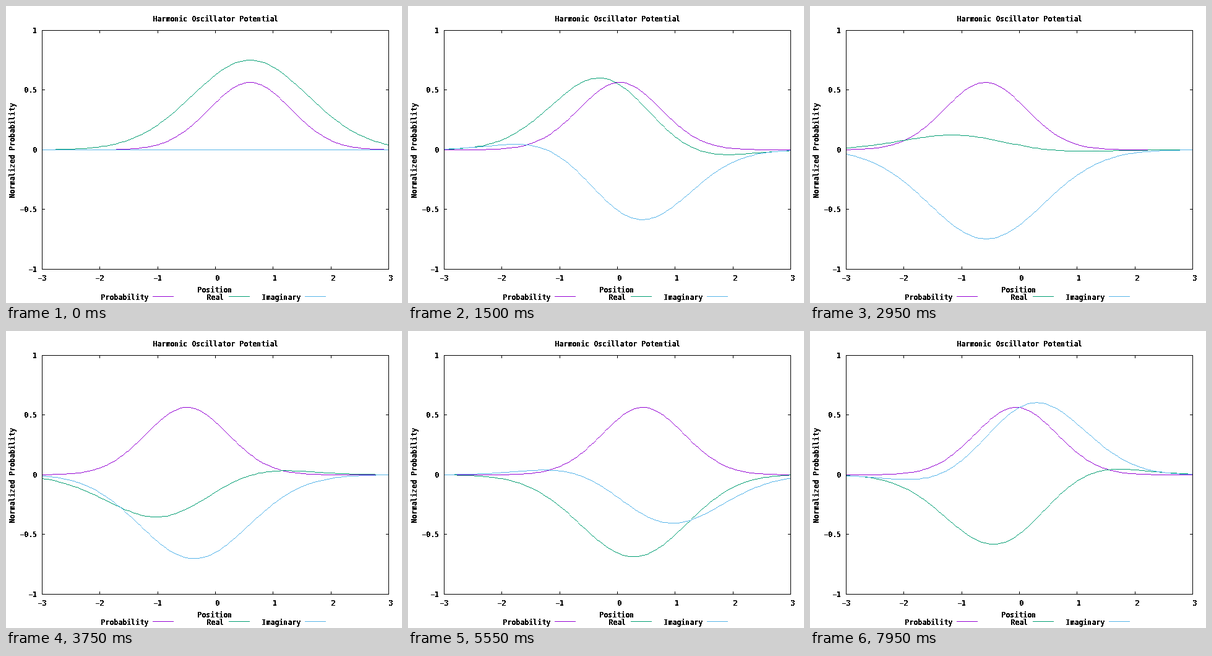
Recreate the animation shown at these times as a matplotlib script. Size 640 by 480 pixels, loop 8000 ms.

```python
import numpy as np
import matplotlib.pyplot as plt
from matplotlib.animation import FuncAnimation

W, H = 640, 480
LEFT, RIGHT, TOP, BOTTOM = 58, 618, 39, 425
ZERO = (TOP + BOTTOM) // 2
TICK = 5
FRAMES, INTERVAL, DT = 160, 50, 0.05
X0 = 0.6  # starting displacement of the packet

PURPLE, GREEN, BLUE = (148, 0, 211), (0, 158, 115), (86, 180, 233)
KEY = [("Probability", 191, 237, PURPLE),
       ("Real", 338, 360, GREEN),
       ("Imaginary", 444, 483, BLUE)]

plt.rcParams.update({
    "font.family": "DejaVu Sans Mono",
    "font.weight": "bold",
    "font.size": 8.37,
    "text.antialiased": False,
    "text.hinting": "force_autohint",
    "text.hinting_factor": 1,  # whole-pixel stems and advances
})

fig = plt.figure(figsize=(6.4, 4.8), dpi=100, facecolor="white")
ax = fig.add_axes([0, 0, 1, 1])
ax.axis("off")


def px(v):
    return np.floor(np.asarray(v) + 0.5).astype(int)


def col(x):
    return px(LEFT + (x + 3) * (RIGHT - LEFT) / 6)


def row(y):
    return ZERO - px(y * (BOTTOM - TOP) / 2)


def make_page():
    page = np.full((H, W, 3), 255, np.uint8)
    for x in range(-2, 3):
        c = col(x)
        page[TOP:TOP + TICK, c] = 0
        page[BOTTOM - TICK + 1:BOTTOM + 1, c] = 0
    for y in (-0.5, 0, 0.5):
        r = row(y)
        page[r, LEFT:LEFT + TICK] = 0
        page[r, RIGHT - TICK + 1:RIGHT + 1] = 0
    for _, _, start, color in KEY:
        page[469, start:start + 34] = color
    return page


def draw_border(page):
    page[[TOP, BOTTOM], LEFT:RIGHT + 1] = 0
    page[TOP:BOTTOM + 1, [LEFT, RIGHT]] = 0


def label(x, baseline, text, **kw):
    kw = {"ha": "center", "va": "baseline", **kw}
    ax.text(x, baseline, text, color="black", **kw)


def number(v):
    return f"{v:g}".replace("-", "\u2212")


xs = np.linspace(-3, 3, 121)
cols = np.arange(LEFT, RIGHT + 1)
page = make_page()


def wave(t):
    """Coherent state of the harmonic oscillator."""
    xc, p = X0 * np.cos(t), -X0 * np.sin(t)
    phase = p * xs - p * xc / 2 - t / 2
    return np.pi ** -0.25 * np.exp(-(xs - xc) ** 2 / 2 + 1j * phase)


def render(i):
    img = page.copy()
    psi = wave(i * DT)
    curves = ((abs(psi) ** 2, PURPLE), (psi.real, GREEN), (psi.imag, BLUE))
    for ys, color in curves:
        img[px(np.interp(cols, col(xs), row(ys))), cols] = color
    draw_border(img)
    return img


image = ax.imshow(render(0), extent=(0, W, H, 0), interpolation="nearest",
                  aspect="auto")
ax.set_xlim(0, W)
ax.set_ylim(H, 0)

label(338.5, 25, "Harmonic Oscillator Potential")
label(337.5, 463, "Position")
label(15, 233, "Normalized Probability", rotation=90, rotation_mode="anchor")
for x in range(-3, 4):
    label(col(x) + (3.5 if x >= 0 else 0.5), 444, number(x))
for y in (-1, -0.5, 0, 0.5, 1):
    label(50.5, row(y) + 5, number(y), ha="right")
for name, x, _, _ in KEY:
    label(x, 475, name)


def update(i):
    image.set_data(render(i))
    return [image]


anim = FuncAnimation(fig, update, frames=FRAMES, interval=INTERVAL,
                     repeat=True, repeat_delay=0)
plt.show()
```
